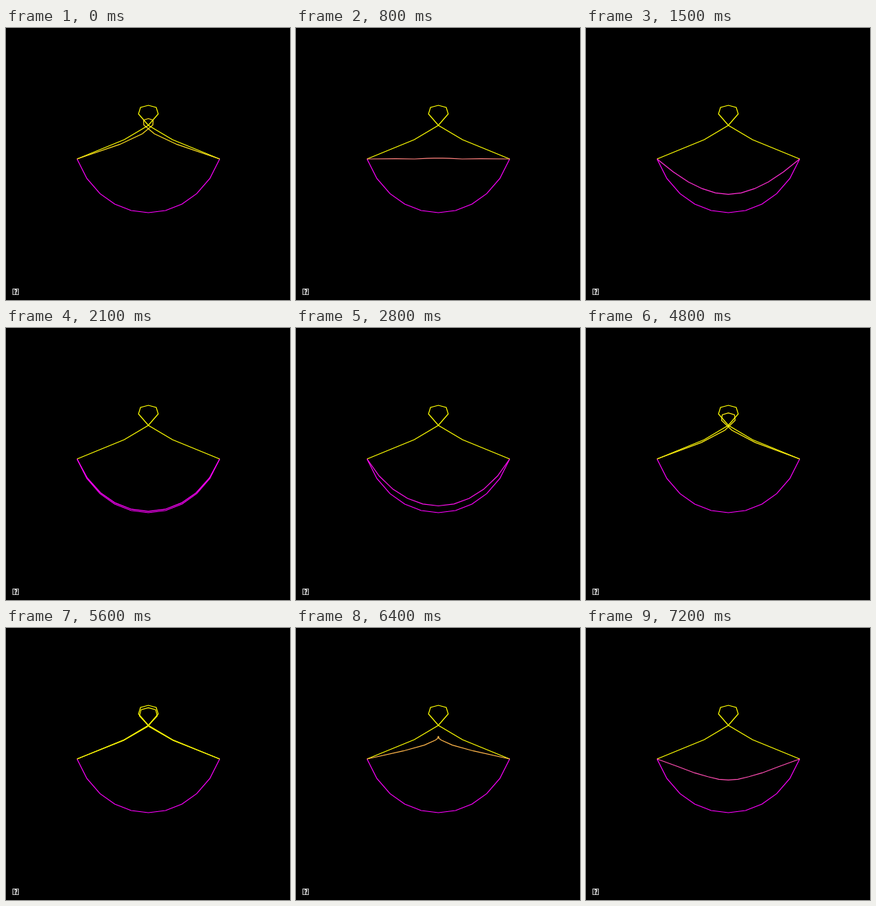
Animation, 397 px wide and 380 px high, one loop 7300 ms. Source, as an HTML page with a canvas:

```html
<!DOCTYPE html>
<html>
<head>
<meta charset="utf-8">
<style>
html, body { margin: 0; width: 100%; height: 100%; overflow: hidden; background: #000; }
canvas { display: block; }
</style>
</head>
<body>
<canvas id="stage" width="397" height="380"></canvas>
<script>
const ctx = document.getElementById('stage').getContext('2d');
const LOOP = 7300, STEP = 100, CENTER = 199;

// Half of each curve as [offset from center, y]; the other half is mirrored.
const mirror = half => {
  const points = half.map(([dx, y]) => [CENTER + dx, y]);
  const rest = half.slice(0, -1).reverse().map(([dx, y]) => [CENTER - dx, y]);
  return points.concat(rest);
};
const knot = mirror([[-99.7, 183], [-33.7, 156], [0, 136], [13.8, 120], [11, 111], [0, 108]]);
const bowl = mirror([[-99.7, 183], [-86, 210.2], [-67.6, 231.4], [-47, 246], [-24, 255], [0, 258]]);

const mix = (a, b, p) => a + (b - a) * p;

function drawCurve(points, p) {
  const fade = Math.round(255 * p);
  ctx.strokeStyle = `rgb(255, ${255 - fade}, ${fade})`;
  ctx.lineWidth = 1.2;
  ctx.beginPath();
  points.forEach(([x, y]) => ctx.lineTo(x, y));
  ctx.stroke();
}

function drawHelpIcon() {
  ctx.fillStyle = '#222';
  ctx.fillRect(9, 364, 9, 9);
  ctx.strokeStyle = '#bbb';
  ctx.lineWidth = 1;
  ctx.strokeRect(9.5, 364.5, 8, 8);
  ctx.fillStyle = '#fff';
  ctx.font = 'bold 8px "DejaVu Sans", sans-serif';
  ctx.textAlign = 'center';
  ctx.fillText('?', 13.8, 371.6);
}

function draw(now) {
  const t = Math.floor((now % LOOP) / STEP) * STEP;
  const p = (1 - Math.cos(0.718 + t / 1000 * Math.PI / 3)) / 2;
  ctx.fillStyle = '#000';
  ctx.fillRect(0, 0, 397, 380);
  drawCurve(knot, 0);
  drawCurve(bowl, 1);
  drawCurve(knot.map(([x, y], i) => [mix(x, bowl[i][0], p), mix(y, bowl[i][1], p)]), p);
  drawHelpIcon();
}

let start;
function tick(now) {
  start ??= now;
  draw(now - start);
  requestAnimationFrame(tick);
}
draw(0);
requestAnimationFrame(tick);
</script>
</body>
</html>
```
